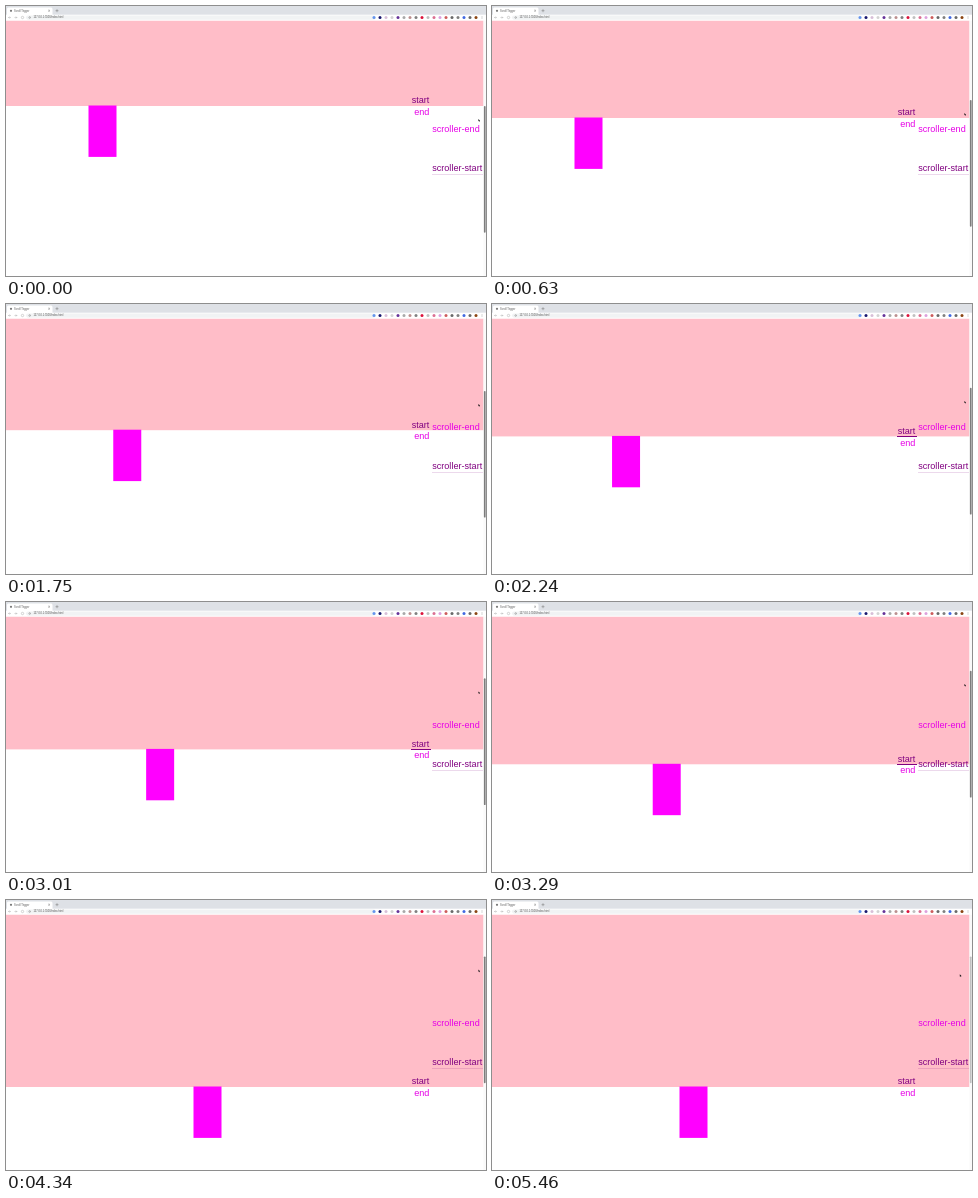
Write an HTML page that moves like this. It is 480 px wide and 270 px high and loops after 5530 ms.

```html
<!DOCTYPE html>
<html lang="en">
<head>
<meta charset="utf-8">
<title>Scroll markers</title>
<style>
  html, body { margin: 0; width: 100%; height: 100%; overflow: hidden; background: #fff; }
  svg { display: block; width: 480px; height: 270px; }
  text { font-family: "Liberation Sans", Arial, sans-serif; }
  .mark { font-size: 9.1px; }
  .start { fill: #800080; }
  .end { fill: #e600e6; }
  .tiny { font-size: 2.6px; fill: #555; }
  .line { fill: none; stroke: #777; stroke-width: .5; }
</style>
</head>
<body>
<svg viewBox="0 0 480 270">
  <!-- page -->
  <rect id="panel" y="14.5" width="477.5" fill="#ffbdc8"/>
  <rect id="box" width="28" height="51.4" fill="#f0f"/>
  <g id="marks">
    <rect class="start" x="404.5" width="20.5" height=".25" shape-rendering="crispEdges"/>
    <text class="mark start" x="423.4" y="-2.7" text-anchor="end">start</text>
    <text class="mark end" x="423.4" y="9.1" text-anchor="end">end</text>
  </g>
  <text class="mark end" x="426.2" y="126.2">scroller-end</text>
  <text class="mark start" x="426.2" y="165.2">scroller-start</text>
  <rect class="start" x="426" y="168" width="51" height=".25" opacity=".6"/>
  <rect x="477.5" y="14.5" width="2.5" height="255.5" fill="#fafafa"/>
  <rect id="thumb" x="477.9" width="1.7" height="126.7" rx=".85"/>

  <!-- browser bar -->
  <rect width="480" height="9" fill="#dee1e6"/>
  <path d="M1 9V3Q1 1.5 2.5 1.5H45Q46.5 1.5 46.5 3V9Z" fill="#fff"/>
  <circle cx="5" cy="4.8" r="1.1" fill="#777"/>
  <text class="tiny" x="8" y="5.7">Scroll Trigger</text>
  <path class="line" d="M42.2 3.8l1.8 1.8m0-1.8l-1.8 1.8M49.5 4.7h3m-1.5-1.5v3"/>
  <rect y="8.7" width="480" height="5.8" fill="#fff"/>
  <path class="line" d="M5 11.5H2.6l1-1m-1 1l1 1M8.5 11.5h2.4l-1-1m1 1l-1 1" opacity=".6"/>
  <circle class="line" cx="16.5" cy="11.5" r="1.2" opacity=".6"/>
  <rect x="20" y="9.4" width="350" height="4.3" rx="2.1" fill="#f1f3f4"/>
  <circle class="line" cx="23.7" cy="11.5" r=".8"/>
  <text class="tiny" x="27.4" y="12.4">127.0.0.1:5500/index.html</text>
  <g id="icons"></g>
  <path class="line" d="M476 10v3" stroke-dasharray=".6"/>
  <path id="cursor" d="M-.6-1.2V1L0 .7.5 1.4.9 1.2.6.4H1.1Z" fill="#111"/>
</svg>
<script>
const $ = id => document.getElementById(id);
const LOOP = 5530, STEP = 70, RELEASE = 4760;

const colors = ("cornflowerblue midnightblue thistle lightgray rebeccapurple darkgray rosybrown gray crimson " +
  "silver palevioletred plum indianred dimgray gray royalblue dimgray saddlebrown").split(" ");
$("icons").innerHTML = colors.map((c, i) =>
  `<circle cx="${368 + 6 * i}" cy="11.6" r="1.5" fill="${c}"/>`).join("");

const clamp = v => Math.max(0, Math.min(1, v));

// Lower edge of the panel: a slow drag that speeds up, as [time, y].
const drag = [[0, 100], [630, 112], [2760, 139], [3010, 147.4], [3360, 166], [3640, 172], [3920, 187]];

function edge(t) {
  return drag.slice(1).reduce((y, [t1, y1], i) => {
    const [t0, y0] = drag[i];
    return y + (y1 - y0) * clamp((t - t0) / (t1 - t0));
  }, drag[0][1]);
}

// The box follows the scroll a quarter of a second late.
const boxX = t => 82.5 + 105 * clamp((edge(t - 250) - 111) / 51);

function set(id, attrs) {
  for (const name in attrs) $(id).setAttribute(name, attrs[name]);
}

function draw(now) {
  const t = Math.floor((now % LOOP) / STEP) * STEP;
  const y = edge(t), thumbY = 150 - y / 2;
  const leave = clamp((t - RELEASE) / 700);
  set("panel", { height: y - 14.5 });
  set("box", { x: boxX(t), y: y - .5 });
  set("marks", { transform: `translate(0 ${y})` });
  set("thumb", { y: thumbY, fill: t < RELEASE ? "#7d7d7d" : "#c1c1c1" });
  set("cursor", { transform: `translate(${473 - 4.6 * leave} ${thumbY + 14.3 + 4.7 * leave})` });
}

let begin;
function tick(now) {
  begin ??= now;
  draw(now - begin);
  requestAnimationFrame(tick);
}
draw(0);
requestAnimationFrame(tick);
</script>
</body>
</html>
```
